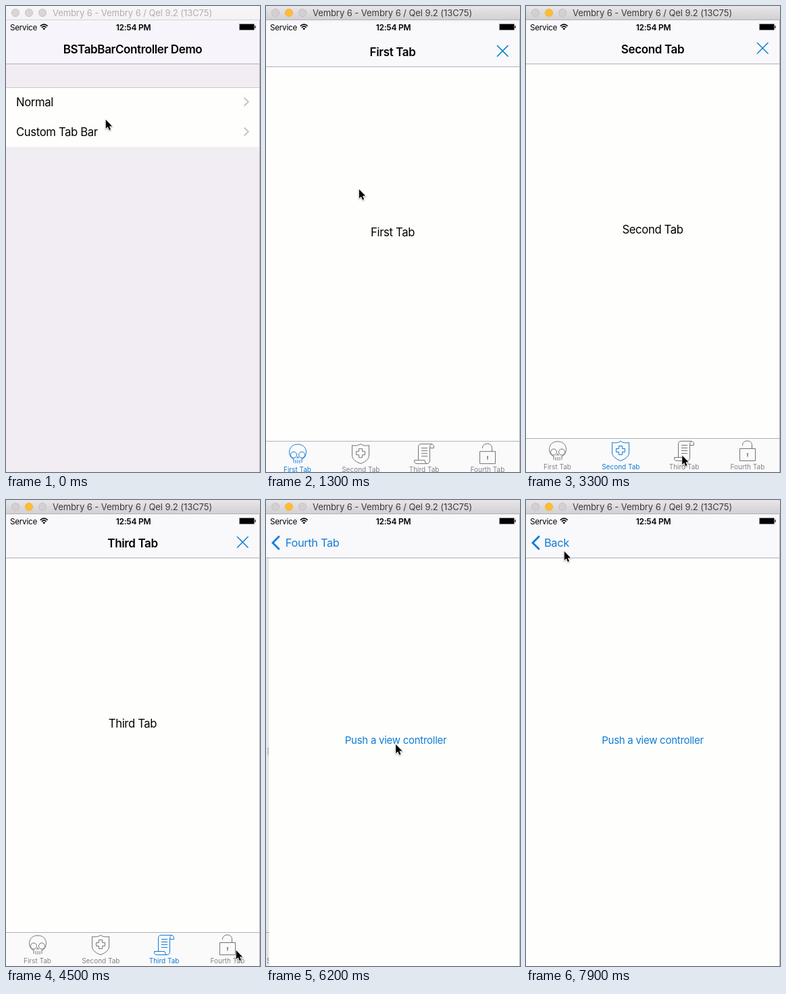
These frames come from a looping animation (376 by 688 pixels, 8000 ms). An HTML page with a canvas:

```html
<!DOCTYPE html>
<html lang="en">
<head>
<meta charset="utf-8">
<title>Tab bar demo</title>
<style>
html, body { margin: 0; width: 100%; height: 100%; overflow: hidden; background: #fff; }
canvas { display: block; width: 376px; height: 688px; }
</style>
</head>
<body>
<canvas id="stage" width="376" height="688"></canvas>
<script>
const ctx = document.getElementById('stage').getContext('2d');
const LOOP = 8000, STEP = 100, WIDTH = 375, HEIGHT = 688, SCREEN = 667;
const BLUE = '#0f7bd6', GRAY = '#828285', ICON_GRAY = '#737376', LINE = '#b0afb4';
const PAPER = '#fefefd', BAR = '#f9f8fb';
const BODY = 16.7, BACK = 16.4;
const TABS = ['First Tab', 'Second Tab', 'Third Tab', 'Fourth Tab'];
const PUSH = 'Push a view controller';

const SELECTED_AT = [0, 2600, 3700, 4700];
const ACTIVE_AT = 600, MODAL_AT = 748, PUSH1_AT = 5707, PUSH2_AT = 6942;
const PRESS1_AT = 5600, PRESS2_AT = 6800;

// time, x, y of the pointer tip
const POINTER = [
  [0, 147, 167], [400, 127, 151], [1000, 127, 151], [1400, 139, 292], [1500, 139, 292],
  [1800, 165, 562], [1900, 165, 562], [2100, 129, 673], [2200, 128, 673], [2400, 137, 662],
  [2700, 137, 662], [3400, 236, 663], [3900, 236, 663], [4400, 340, 664], [4800, 340, 664],
  [5500, 192, 365], [5900, 192, 365], [6500, 191, 355], [7000, 191, 355], [7800, 58, 77], [7900, 56, 75]
];

const lerp = (a, b, k) => a + (b - a) * k;
const clamp = k => Math.min(1, Math.max(0, k));

// critically damped spring from 0 to 1
function spring(t, start) {
  const a = Math.max(0, t - start) * 0.013;
  return 1 - (1 + a) * Math.exp(-a);
}

function pointerAt(t) {
  const next = POINTER.findIndex(p => p[0] > t);
  if (next < 0) return POINTER[POINTER.length - 1].slice(1);
  const [t0, x0, y0] = POINTER[next - 1], [t1, x1, y1] = POINTER[next];
  const k = (t - t0) / (t1 - t0), e = k * k * (3 - 2 * k);
  return [lerp(x0, x1, e), lerp(y0, y1, e)];
}

function rect(x, y, w, h, color) {
  ctx.fillStyle = color;
  ctx.fillRect(x, y, w, h);
}

function stroke(path, color, width = 1) {
  ctx.strokeStyle = color;
  ctx.lineWidth = width;
  ctx.stroke(new Path2D(path));
}

function setFont(size, weight, spacing = size > 11 ? -0.022 : 0) {
  ctx.font = `${weight} ${size}px Inter, "Open Sans", sans-serif`;
  ctx.letterSpacing = `${spacing * size}px`;
}

// y is the middle of the capitals
function text(str, x, y, { size = BODY, weight = 400, color = '#000', align = 'center', alpha = 1, spacing } = {}) {
  if (alpha <= 0) return;
  setFont(size, weight, spacing);
  ctx.textAlign = align;
  ctx.fillStyle = color;
  ctx.globalAlpha = alpha;
  ctx.fillText(str, x, Math.round(y + size * 0.36));
  ctx.globalAlpha = 1;
}

function at(x, y, draw) {
  ctx.save();
  ctx.translate(x, y);
  draw();
  ctx.restore();
}

const ICONS = [
  c => {
    stroke('M-9 6C-15 1 -14 -14 0 -14S15 1 9 6M-6 7V13M-3 9V14M0 9V14M3 9V14M6 7V13M-9 6L-6 8M9 6L6 8', c);
    stroke('M-1.5 1.5A4.5 4.5 0 1 1-10.5 1.5A4.5 4.5 0 1 1-1.5 1.5M10.5 1.5A4.5 4.5 0 1 1 1.5 1.5A4.5 4.5 0 1 1 10.5 1.5M-1.5 7L0 4L1.5 7', c);
  },
  c => {
    stroke('M0 -14.5Q5 -11 12.5 -12.5V3Q12 10 0 14.5Q-12 10 -12.5 3V-12.5Q-5 -11 0 -14.5Z', c);
    stroke('M-2.5 -7.5H2.5V-3.5H6.5V1.5H2.5V5.5H-2.5V1.5H-6.5V-3.5H-2.5Z', c);
  },
  c => {
    stroke('M-5 -14.5H11Q15 -14 14.5 -8.5H8.5M11 -14.5Q8 -13 8.5 -8V9Q9 14 4 14.5H-11Q-15 14 -14.5 9.5H1Q1 14 4 14.5M-5 -14.5Q-9 -14 -8.5 -9V9', c);
    stroke('M-4 -8.5H5M-4 -4.5H5M-4 -.5H5M-4 3.5H5', c);
  },
  c => {
    stroke('M-11.5 -3.5H11.5V14.5H-11.5ZM-7.5 -8V-9A7 6 0 0 1 6.5 -9V-3.5', c);
    stroke('M0 4V8.5M-1 4H1', c, 1.4);
  }
];

function tabBar(selected) {
  rect(0, 638, WIDTH, 50, '#fbfafb');
  rect(0, 638, WIDTH, 1, LINE);
  TABS.forEach((name, i) => {
    const x = 46.5 + 93.8 * i, on = i === selected;
    at(Math.round(x), 657, () => ICONS[i](on ? BLUE : ICON_GRAY));
    text(name, x, 680, { size: 10, color: on ? BLUE : GRAY });
  });
}

function windowBar(active) {
  const g = ctx.createLinearGradient(0, 0, 0, 20);
  g.addColorStop(0, active ? '#e8e6e9' : '#f7f6f7');
  g.addColorStop(1, active ? '#d2d0d3' : '#f4f3f4');
  rect(0, 0, 376, 21, g);
  rect(0, 20, 376, 1, active ? '#b3b1b4' : '#d5d3d6');
  [14, 34, 54].forEach((x, i) => {
    const lit = active && i === 1;
    ctx.beginPath();
    ctx.arc(x, 10, 5.6, 0, 7);
    ctx.fillStyle = lit ? '#fdbc33' : active ? '#d2d0d3' : '#d8d6d9';
    ctx.fill();
    ctx.strokeStyle = lit ? '#f3b035' : '#bebcc0';
    ctx.lineWidth = 0.8;
    ctx.stroke();
  });
  text('Vembry 6 - Vembry 6 / Qel 9.2 (13C75)', 187, 10.5,
    { size: 13, spacing: -0.005, color: active ? '#3c3b3d' : '#b0aeb1' });
}

function statusBar() {
  text('Service', 6, 31.5, { size: 11.7, align: 'left' });
  stroke('M50.8 29.6Q56.2 24.6 61.6 29.6M52.8 31.8Q56.2 28.6 59.6 31.8', '#000', 1.6);
  ctx.fillStyle = '#000';
  ctx.fill(new Path2D('M54.2 33.3Q56.2 31.6 58.2 33.3L56.2 35.5Z'));
  text('12:54 PM', 188.5, 31.5, { size: 12, weight: 600 });
  stroke('M345.5 26.5H367.5V35.5H345.5Z', '#8f8f91');
  rect(346, 27, 21, 8, '#000');
  rect(368, 29, 1.5, 4, '#333');
}

function navBackground(color = BAR) {
  rect(0, 21, WIDTH, 64, color);
  rect(0, 85, WIDTH, 1, LINE);
}

function closeIcon(alpha) {
  ctx.globalAlpha = alpha;
  stroke('M342 54L358.5 70.5M358.5 54L342 70.5', '#1684cc', 1.6);
  ctx.globalAlpha = 1;
}

function backChevron(alpha) {
  ctx.globalAlpha = alpha;
  stroke('M19.8 53.3L9.9 63.2L19.8 73.1', BLUE, 2.8);
  ctx.globalAlpha = 1;
}

function home(t) {
  rect(0, 21, WIDTH, SCREEN, '#f2edf3');
  navBackground('#f7f5fb');
  text('BSTabBarController Demo', 187.5, 63.5, { size: 17, weight: 600 });
  rect(0, 121, WIDTH, 87, PAPER);
  if (t >= ACTIVE_AT) rect(0, 121, WIDTH, 43, '#dcdbdc');
  rect(0, 120, WIDTH, 1, '#c9c6cc');
  ['Normal', 'Custom Tab Bar'].forEach((label, i) => {
    const y = 142 + 44 * i;
    text(label, 15, y, { align: 'left' });
    stroke(`M352.5 ${y - 6.5}L358.8 ${y - 0.5}L352.5 ${y + 5.5}`, '#c3c2c7', 1.8);
  });
}

function pushButton(y, alpha) {
  text(PUSH, 187.5, y, { size: 15, color: BLUE, alpha, spacing: -0.018 });
}

function tabPage(t, selected) {
  rect(0, 21, WIDTH, SCREEN, PAPER);
  text(TABS[selected], 187.5, 330);
  if (selected === 3) pushButton(371.5, t >= PRESS1_AT ? 0.35 : 1);
  tabBar(selected);
}

function detailPage(pressed) {
  rect(0, 21, WIDTH, SCREEN, PAPER);
  pushButton(355, pressed ? 0.27 : 1);
}

function slideIn(progress, dim, under, over) {
  const x = WIDTH * (1 - progress);
  at(-0.3 * WIDTH * progress, 0, under);
  if (progress <= 0) return;
  rect(0, 21, x, SCREEN, `rgba(0,0,0,${dim * progress})`);
  const g = ctx.createLinearGradient(x - 9, 0, x, 0);
  g.addColorStop(0, 'rgba(20,20,30,0)');
  g.addColorStop(1, `rgba(20,20,30,${0.25 * (1 - progress)})`);
  rect(x - 9, 21, 9, SCREEN, g);
  at(x, 0, over);
}

function navItems(selected, p1, p2) {
  const n1 = p1 ** 1.2, n2 = p2 ** 1.2;
  const fade = n => clamp(1 - 2.1 * n);
  setFont(BACK, 400);
  const titleHalf = ctx.measureText(TABS[selected]).width / 2;
  const backHalf = ctx.measureText('Back').width / 2;
  const titleX = lerp(187.5, 27 + titleHalf, n1) - 113 * n2;
  text(TABS[selected], titleX, 63.5, { size: 17, weight: 600, alpha: fade(n1) });
  text(TABS[selected], titleX, 63.5, { size: BACK, color: BLUE, alpha: n1 * clamp(1 - 2.8 * n2) });
  closeIcon(fade(n1));
  backChevron(clamp(2 * n1 - 1));
  text('Back', lerp(188, 27, n2) + backHalf, 63.5, { size: BACK, color: BLUE, alpha: n2 });
}

function modal(t) {
  const selected = SELECTED_AT.filter(s => t >= s).length - 1;
  const p1 = spring(t, PUSH1_AT), p2 = spring(t, PUSH2_AT);
  if (p2 > 0) slideIn(p2, 0, () => detailPage(true), () => detailPage(false));
  else slideIn(p1, 0.09, () => tabPage(t, selected), () => detailPage(t >= PRESS2_AT));
  navBackground();
  navItems(selected, p1, p2);
}

function pointer(x, y) {
  at(x + 0.7, y + 0.8, () => {
    const arrow = new Path2D('M0 0V13.2L3 10.4L5.2 15.4L7.3 14.5L5.2 9.6H9.4Z');
    ctx.shadowColor = 'rgba(0,0,0,0.35)';
    ctx.shadowBlur = 2;
    ctx.shadowOffsetY = 1;
    ctx.strokeStyle = '#fff';
    ctx.lineWidth = 1.6;
    ctx.stroke(arrow);
    ctx.shadowColor = 'transparent';
    ctx.fillStyle = '#000';
    ctx.fill(arrow);
  });
}

function draw(t) {
  rect(0, 0, 376, HEIGHT, PAPER);
  home(t);
  if (t > MODAL_AT) at(0, SCREEN * (1 - spring(t, MODAL_AT)), () => modal(t));
  statusBar();
  rect(375, 21, 1, SCREEN, '#b5b3b7');
  windowBar(t >= ACTIVE_AT);
  pointer(...pointerAt(t));
}

const start = performance.now();
function tick() {
  const t = (performance.now() - start) % LOOP;
  draw(Math.floor(t / STEP) * STEP);
  requestAnimationFrame(tick);
}
tick();
</script>
</body>
</html>
```
